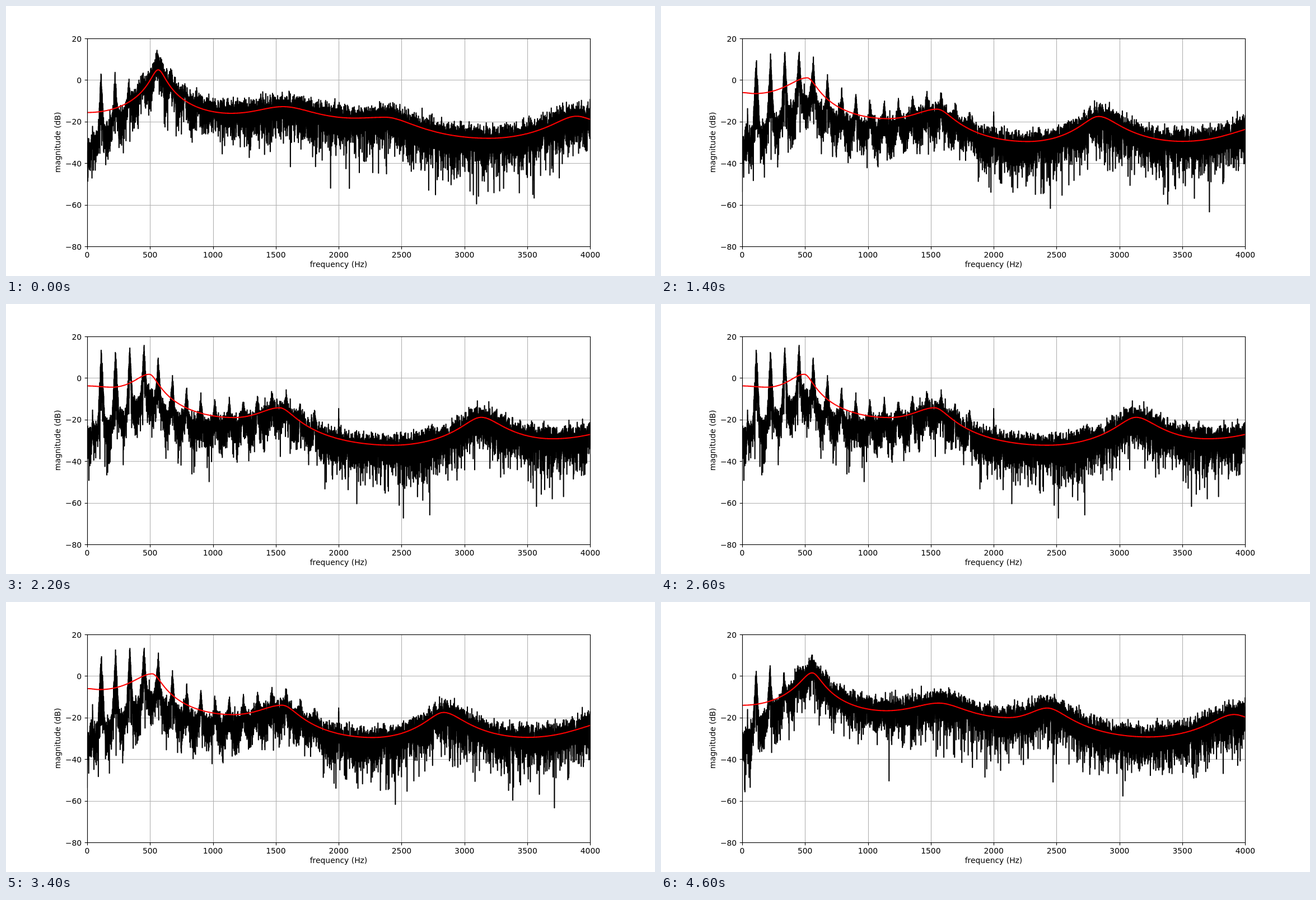
An HTML page for the animation above (4.8 s loop, 1159 px wide and 483 px high).

```html
<!DOCTYPE html>
<html lang="en">
<head>
<meta charset="utf-8">
<title>Spectrum with formant envelope</title>
<style>
  html, body { margin: 0; width: 100%; height: 100%; overflow: hidden; background: #fff; }
  svg { display: block; width: 1159px; height: 483px; }
  text { font: 13.89px "DejaVu Sans", sans-serif; fill: #000; }
  .grid { stroke: #b0b0b0; stroke-width: 1.11; }
  .axis { stroke: #000; stroke-width: 1.11; fill: none; }
  .curve { fill: none; stroke-width: 2.083; stroke-linejoin: round; stroke-linecap: square; }
</style>
</head>
<body>
<svg viewBox="0 0 1159 483">
  <defs><clipPath id="plot"><rect x="144.9" y="58" width="898.5" height="372.1"/></clipPath></defs>
  <g id="grid"></g>
  <g clip-path="url(#plot)">
    <path id="spectrum" class="curve" stroke="#000"/>
    <path id="envelope" class="curve" stroke="#f00"/>
  </g>
  <g id="axes"></g>
  <text x="594" y="467" text-anchor="middle">frequency (Hz)</text>
  <text transform="translate(97 244) rotate(-90)" text-anchor="middle">magnitude (dB)</text>
</svg>
<script>
const STEP_MS = 200, STEPS = 24;
const LEFT = 144.9, RIGHT = 1043.4, TOP = 58, BOTTOM = 430.1;
const MAX_HZ = 4000, BIN_HZ = .5;

const mix = (a, b, t) => a + (b - a) * t;
const xOf = hz => mix(LEFT, RIGHT, hz / MAX_HZ);
const yOf = db => mix(TOP, BOTTOM, (20 - db) / 100);
const power = db => 10 ** (db / 10);
const easeOut = t => 1 - (1 - t) ** 2;
const smooth = t => { t = Math.min(1, Math.max(0, t)); return t * t * (3 - 2 * t); };
const $ = id => document.getElementById(id);

// Turning points of the envelope as [Hz, dB], peak and trough in turn.
const poses = [
  { step: 0, turns: [[0, -15.6], [5, -15.6], [565, 4.9], [1145, -16], [1559, -12.8],
                     [2124, -18.3], [2370, -17.9], [3193, -28], [3892, -17.4], [4119, -20.3]] },
  { step: 3, turns: [[0, -12.8], [5, -12.8], [540, -1.2], [1149, -17.2], [1572, -13.2],
                     [2115, -21.3], [2536, -13.4], [3304, -30.3], [3950, -19.4], [4185, -22.7]] },
  { step: 11, turns: [[0, -3.8], [200, -4.4], [494, 1.8], [1171, -19], [1528, -14.3],
                      [2427, -32.3], [3133, -18.9], [3700, -29.2], [4297, -23.6], [4600, -29]] },
];

// Turning points drift steadily in frequency while their levels settle.
function turnsAt(step) {
  const [a, b] = step < poses[1].step ? poses : poses.slice(1);
  const t = (step - a.step) / (b.step - a.step);
  return a.turns.map(([hz, db], i) => [mix(hz, b.turns[i][0], t), mix(db, b.turns[i][1], easeOut(t))]);
}

// Between a peak and a trough the level falls like a resonance and ends flat.
function envelopeDb(turns, hz) {
  const i = Math.max(1, turns.findIndex(turn => turn[0] > hz));
  const [peak, trough] = i % 2 ? [turns[i - 1], turns[i]] : [turns[i], turns[i - 1]];
  const u = (hz - peak[0]) / (trough[0] - peak[0]);
  const depth = 10 ** ((peak[1] - trough[1]) / 12) - 1;
  return peak[1] - 12 * Math.log10(1 + depth * Math.sin(u * Math.PI / 2) ** 2);
}

function randomFrom(seed) {
  return () => {
    seed = seed + 0x6D2B79F5 | 0;
    let t = Math.imul(seed ^ seed >>> 15, 1 | seed);
    t = t + Math.imul(t ^ t >>> 7, 61 | t) ^ t;
    return ((t ^ t >>> 14) >>> 0) / 4294967296;
  };
}

// Harmonics of the voice plus three steady hums; slope is dB per Hz away from the centre.
function tonesOf(turns, voice) {
  const tones = [[43, mix(-16, -12, voice)], [2000, -12], [MAX_HZ, mix(-7, -16, voice)]]
    .map(([hz, db]) => ({ hz, db, slope: 4.5 }));
  for (let k = 1; k <= 16; k++) {
    const hz = k * mix(111, 113, voice);
    const breathy = 10 + 10 * Math.exp(-((k / 2.8) ** 4)) - 8 * (k / 10) ** 4;
    const voiced = 9.5 + 12 * Math.exp(-((k / 5) ** 2));
    tones.push({
      hz,
      db: envelopeDb(turns, hz) + mix(breathy, voiced, voice),
      slope: 1.57 / (1 + k * mix(.35, .15, voice)),
    });
  }
  return tones;
}

function pathOf(levelAt, stepHz) {
  let d = "";
  for (let hz = 0; hz <= MAX_HZ; hz += stepHz) {
    d += (hz ? "L" : "M") + xOf(hz).toFixed(2) + " " + yOf(levelAt(hz)).toFixed(2);
  }
  return d;
}

function makeScene(step) {
  const turns = turnsAt(step), voice = smooth((step - 1) / 6);
  const tones = tonesOf(turns, voice), random = randomFrom(101 + step * 37);
  const envelope = hz => envelopeDb(turns, hz);
  const spectrum = hz => {
    const dip = mix(18 * Math.max(0, 1 - hz / 400), 25 * Math.exp(-hz / 700), voice);
    let p = power(envelope(hz) - dip) * -Math.log(1 - random());
    const flutter = random() ** 2;
    for (const tone of tones) {
      const off = Math.abs(hz - tone.hz);
      if (off < 110) p += power(tone.db - tone.slope * off) * flutter;
    }
    return 10 * Math.log10(p + 1e-9);
  };
  return { envelope: pathOf(envelope, 4), spectrum: pathOf(spectrum, BIN_HZ) };
}

function drawAxes() {
  const snap = v => Math.round(v) + .5;
  const line = (x1, y1, x2, y2, cls) =>
    `<line class="${cls}" x1="${x1}" y1="${y1}" x2="${x2}" y2="${y2}"/>`;
  const label = (x, y, anchor, value) =>
    `<text x="${x}" y="${y}" text-anchor="${anchor}">${String(value).replace("-", "\u2212")}</text>`;
  const [l, r, t, b] = [LEFT, RIGHT, TOP, BOTTOM].map(snap);
  let grid = "", axes = `<rect class="axis" x="${l}" y="${t}" width="${r - l}" height="${b - t}"/>`;
  for (let hz = 0; hz <= MAX_HZ; hz += 500) {
    const x = snap(xOf(hz));
    grid += line(x, t, x, b, "grid");
    axes += line(x, b, x, b + 4.86, "axis") + label(xOf(hz), 450, "middle", hz);
  }
  for (let db = -80; db <= 20; db += 20) {
    const y = snap(yOf(db));
    grid += line(l, y, r, y, "grid");
    axes += line(l - 4.86, y, l, y, "axis") + label(135.2, Math.round(yOf(db) + 5.6), "end", db);
  }
  $("grid").innerHTML = grid;
  $("axes").innerHTML = axes;
}

const scenes = Array.from({ length: STEPS / 2 + 1 }, (_, step) => makeScene(step));

let shown = -1;
function render(ms) {
  const tick = Math.floor(ms / STEP_MS) % STEPS;
  const step = Math.min(tick, STEPS - tick);   // forward, then back
  if (step === shown) return;
  shown = step;
  for (const id of ["spectrum", "envelope"]) $(id).setAttribute("d", scenes[step][id]);
}

drawAxes();
render(0);
let start;
requestAnimationFrame(function loop(now) {
  start ??= now;
  render(Math.max(0, now - start));
  requestAnimationFrame(loop);
});
</script>
</body>
</html>
```
